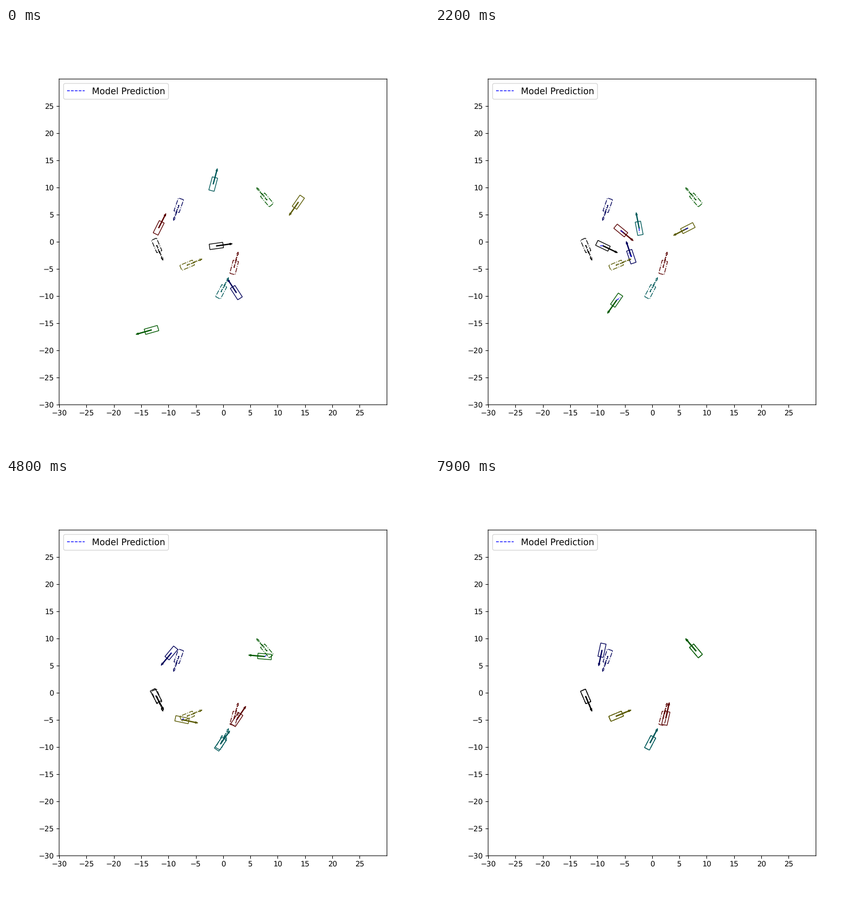
Recreate the animation shown at these times as a matplotlib script. Size 748 by 748 pixels, loop 8000 ms.

```python
import numpy as np
import matplotlib.pyplot as plt
from matplotlib.animation import FuncAnimation
from matplotlib.patches import FancyArrow, Polygon

plt.rcParams.update({"path.snap": False, "text.hinting": "no_hinting"})

STEPS = 80
TIMES = np.array([0, 14, 30, 40, 56, 68, 79])  # steps at which poses are given
LENGTH, WIDTH = 2.5, 1.0
SHADE = 0.35

fig = plt.figure(figsize=(8, 8), dpi=93.5)
half = 0.47 / 748
ax = fig.add_axes([0.125 + half, 0.11 - half, 0.775, 0.77])
ax.set(xlim=(-30, 30), ylim=(-30, 30),
       xticks=np.arange(-30, 30, 5), yticks=np.arange(-30, 30, 5))


def axis(deg):
    a = np.radians(deg)
    return np.array([np.cos(a), np.sin(a)])


def outline(x, y, deg):
    """Corners, starting at the rear left."""
    u, v = axis(deg) * LENGTH / 2, axis(deg + 90) * WIDTH / 2
    return np.array([x, y]) + np.array([v - u, -u - v, u - v, u + v])


def draw_pose(pose, color, ls="-"):
    x, y, deg = pose
    style = dict(ec=color, lw=1, ls=ls)
    body = ax.add_patch(Polygon(outline(*pose), closed=True, fill=False, **style))
    arrow = ax.add_patch(FancyArrow(x, y, *(LENGTH * axis(deg)), width=0.1,
                                    fc=color, fill=ls == "-", **style))
    return body, arrow


class Car:
    """Drives smoothly through (x, y, heading) poses, rolling along its heading."""

    def __init__(self, rgb, goal, *poses):
        color = [SHADE * c for c in rgb]
        poses = list(poses) + [goal] * (len(TIMES) - len(poses))
        self.p = np.array(poses, float)
        self.m = np.gradient(self.p, TIMES, axis=0)
        for m, pose in zip(self.m, self.p):
            u = axis(pose[2])
            m[:2] = u * (m[:2] @ u)
        resting = np.all(np.diff(self.p, axis=0) == 0, axis=1)
        self.m[:-1][resting] = 0
        self.m[[0, -1]] = 0
        draw_pose(goal, color, "-.")
        self.body, self.arrow = draw_pose(self.p[0], color)
        self.ahead, = ax.plot([], [], "b--", lw=1)

    def pose(self, step):
        step = min(step, TIMES[-1])
        i = min(np.searchsorted(TIMES, step, side="right"), len(TIMES) - 1) - 1
        h = TIMES[i + 1] - TIMES[i]
        s = (step - TIMES[i]) / h
        ease = s * s * (3 - 2 * s)
        return (self.p[i] + ease * (self.p[i + 1] - self.p[i])
                + h * s * (1 - s) * ((1 - s) * self.m[i] - s * self.m[i + 1]))

    def update(self, step):
        now, nxt = self.pose(step), self.pose(step + 1)
        dx, dy = LENGTH * axis(now[2])
        self.body.set_xy(outline(*now))
        self.arrow.set_data(x=now[0], y=now[1], dx=dx, dy=dy)
        trail = np.array([now, nxt]) if step else np.empty((0, 3))
        self.ahead.set_data(trail[:, 0], trail[:, 1])


# Each car: colour, goal, then its poses; a car with no more poses is at its goal.
cars = [
    Car((0, 0, 0), (-12.15, -0.65, -67),
        (-1.23, -0.75, 8), (-4.66, -0.63, -4), (-12.3, -0.5, -46.4),
        (-12.43, -0.41, -53)),
    Car((1, 0, 0), (2.03, -4.71, 75.5),
        (-11.78, 2.58, 63.4), (-9.92, 4.19, 9.3), (-1.49, -1.95, -55.8),
        (2.13, -5.29, 38.5), (2.73, -4.66, 55.2), (2.5, -4.71, 78.5),
        (2.52, -4.66, 77.5)),
    Car((0, 1, 0), (8.04, 7.73, 130),
        (-13.1, -16.22, 196), (-10.52, -14.02, 233.7), (-1.33, -5.81, 234.9),
        (5.09, 3.27, 250.4), (9.02, 7.47, 101), (9.02, 7.11, 135.5)),
    Car((0, 0, 1), (-8.1, 6.74, 251),
        (2.43, -9.35, 122.8), (-0.04, -7.11, 137.9), (-6.63, 2.79, 101),
        (-8.63, 8.05, 197.5), (-9.99, 6.85, 242), (-9.06, 8.25, 252),
        (-9.16, 7.86, 258)),
    Car((1, 1, 0), (-6.58, -4.3, 382.8),
        (13.78, 7.31, 235.4), (11.3, 4.92, 217.9), (0.17, -0.47, 210),
        (-8.83, -4.82, 252.9), (-5.68, -3.41, 432.2), (-5.7, -3.31, 418)),
    Car((0, 1, 1), (-0.35, -9.2, 62.5),
        (-1.8, 10.65, 75.2), (-2.26, 7.73, 85), (-1.72, -3.36, 104),
        (-0.04, -8.72, 60), (-0.42, -9.3, 61)),
]

ax.legend([plt.Line2D([], [], color="b", ls="--", lw=1)], ["Model Prediction"],
          loc="upper left", fontsize=12)


def update(step):
    for car in cars:
        car.update(step)
    return []


anim = FuncAnimation(fig, update, frames=STEPS, interval=100, repeat=True,
                     repeat_delay=0, blit=False)
plt.show()
```
